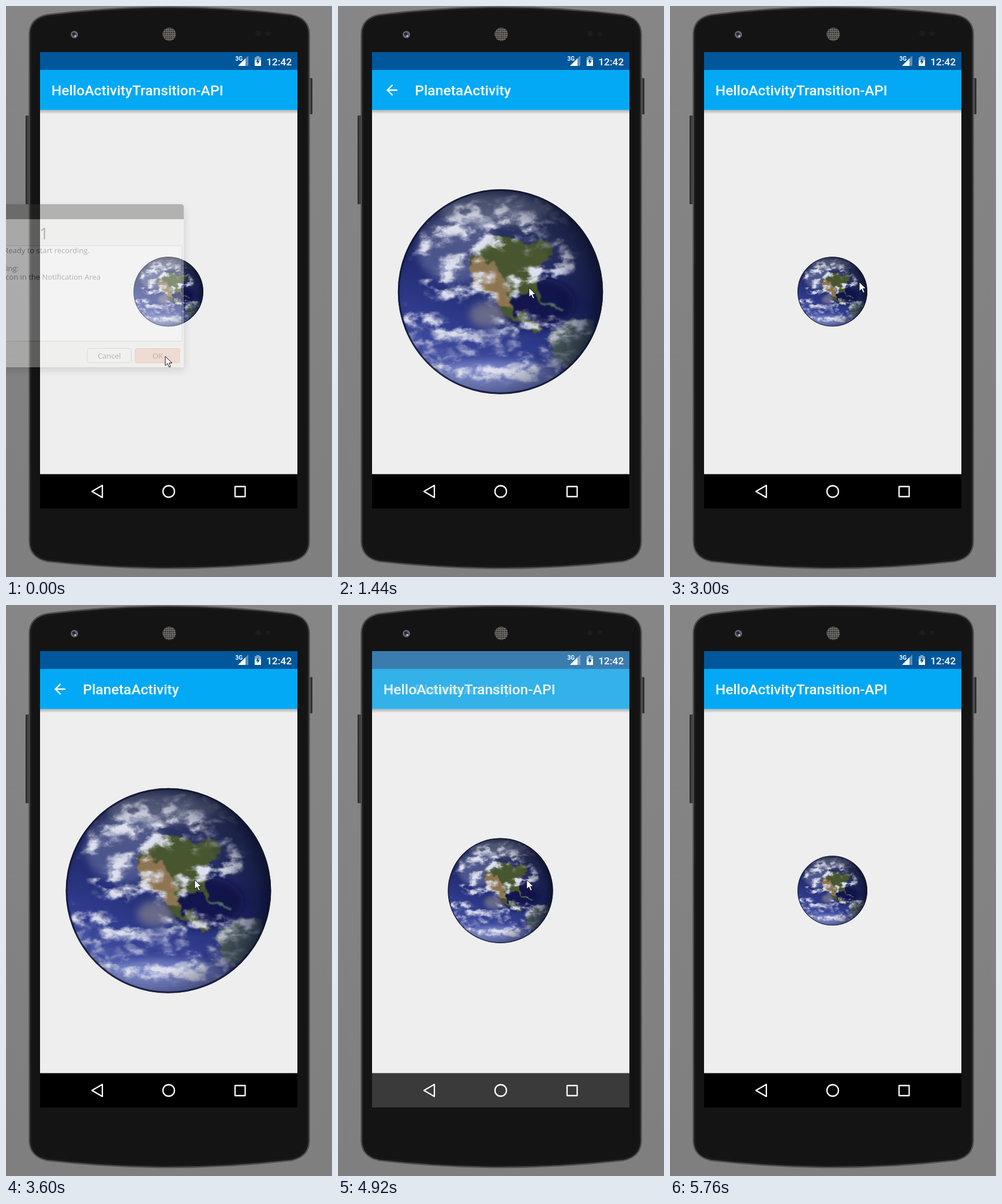
An HTML page that plays this animation: 565 px wide and 991 px high, repeating every 6.96 s.

```html
<!DOCTYPE html>
<html lang="en">
<head>
<meta charset="utf-8">
<title>Activity transition</title>
<style>
  html, body { margin: 0; width: 100%; height: 100%; overflow: hidden; background: #828282; }
  svg { display: block; width: 100%; height: 100%; }
  text { font-family: Roboto, sans-serif; font-weight: 500; fill: #fff; white-space: pre; }
  .title { font-size: 24.65px; }
  #dialog text { font-family: "Open Sans", "Noto Sans", sans-serif; font-weight: 400; font-size: 13px; fill: #3c3c3c; }
</style>
</head>
<body>
<svg viewBox="0 0 565 991" preserveAspectRatio="none">
  <defs>
    <linearGradient id="backdrop" x2="0" y2="1">
      <stop stop-color="#868686"/><stop offset="1" stop-color="#7f7f7f"/>
    </linearGradient>
    <linearGradient id="barShadow" x2="0" y2="1">
      <stop stop-color="#000" stop-opacity=".26"/><stop offset="1" stop-color="#000" stop-opacity="0"/>
    </linearGradient>
    <linearGradient id="sideKey">
      <stop stop-color="#1c1c1c"/><stop offset=".5" stop-color="#484848"/><stop offset="1" stop-color="#202020"/>
    </linearGradient>
    <linearGradient id="ocean" x1=".25" x2=".6" y1="1" y2="0">
      <stop stop-color="#5563b4"/><stop offset=".3" stop-color="#303c8e"/>
      <stop offset=".6" stop-color="#1f2868"/><stop offset="1" stop-color="#343b5a"/>
    </linearGradient>
    <radialGradient id="shade" cx=".4" cy=".53" r=".62">
      <stop offset=".6" stop-color="#0a1030" stop-opacity="0"/>
      <stop offset=".85" stop-color="#0a1030" stop-opacity=".5"/>
      <stop offset="1" stop-color="#080c22" stop-opacity=".92"/>
    </radialGradient>
    <radialGradient id="lens">
      <stop stop-color="#2a2f48"/><stop offset=".55" stop-color="#565a70"/><stop offset="1" stop-color="#707072"/>
    </radialGradient>
    <pattern id="mesh" width="3.4" height="3.4" patternUnits="userSpaceOnUse">
      <rect width="3.4" height="3.4" fill="#77746f"/><circle cx="1.7" cy="1.7" r="1.15" fill="#1a1a1a"/>
    </pattern>
    <clipPath id="disc"><circle r="178"/></clipPath>
    <filter id="rough" x="-20%" y="-20%" width="140%" height="140%" color-interpolation-filters="sRGB">
      <feTurbulence type="fractalNoise" baseFrequency=".06" numOctaves="4" seed="5"/>
      <feDisplacementMap in="SourceGraphic" scale="18" xChannelSelector="R" yChannelSelector="G"/>
      <feGaussianBlur stdDeviation="1.2"/>
    </filter>
    <!-- soft shapes broken up by fine noise -->
    <filter id="wisps" x="-20%" y="-20%" width="140%" height="140%" color-interpolation-filters="sRGB">
      <feTurbulence type="fractalNoise" baseFrequency=".03 .045" numOctaves="5" seed="8" result="noise"/>
      <feColorMatrix in="noise" values="0 0 0 0 .87  0 0 0 0 .88  0 0 0 0 .93  4.5 0 0 0 -1.65" result="mist"/>
      <feGaussianBlur in="SourceGraphic" stdDeviation="4"/>
      <feDisplacementMap in2="noise" scale="40" xChannelSelector="G" yChannelSelector="B" result="mask"/>
      <feComposite in="mist" in2="mask" operator="in"/>
    </filter>
    <filter id="soft" x="-20%" y="-20%" width="140%" height="140%"><feGaussianBlur stdDeviation="7"/></filter>
    <clipPath id="screen"><rect x="59" y="80" width="446" height="792"/></clipPath>
  </defs>

  <rect width="565" height="991" fill="url(#backdrop)"/>

  <!-- phone body -->
  <rect x="34" y="190" width="7" height="154" rx="1.5" fill="url(#sideKey)"/>
  <rect x="524" y="125" width="7" height="63" rx="1.5" fill="url(#sideKey)"/>
  <path d="M40.500 48C41 30 51 19 72 15Q180 2 283 2T494 15C515 19 525 30 525.500 48V930C525 949 514 960 494 964Q386 976 283 976T72 964C52 960 41 949 40.500 930Z"
    fill="#141414" stroke="#4e4e50" stroke-width="2.400"/>
  <path d="M43.500 49C44 33 54 22 74 18Q180 5 283 5T492 18C512 22 522 33 522.500 49V929C522 946 512 957 492 961Q386 973 283 973T74 961C54 957 44 946 43.500 929Z"
    fill="none" stroke="#222"/>
  <circle cx="118.500" cy="49.500" r="6.300" fill="url(#lens)"/>
  <circle cx="117.500" cy="48.500" r="2.600" fill="#20243c"/>
  <circle cx="120" cy="52" r="1.500" fill="#d5d5e2"/>
  <circle cx="283" cy="49" r="11.500" fill="url(#mesh)"/>
  <circle cx="437" cy="48" r="5" fill="#1e1b1b"/>
  <circle cx="454" cy="48" r="4" fill="#1e1b1b"/>

  <!-- screen -->
  <g clip-path="url(#screen)">
    <rect x="59" y="80" width="446" height="792" fill="#eee"/>
    <rect x="59" y="180.500" width="446" height="7" fill="url(#barShadow)"/>
    <rect x="59" y="80" width="446" height="31" fill="#01579b"/>
    <rect x="59" y="111" width="446" height="69.500" fill="#03a9f4"/>
    <rect x="59" y="812.500" width="446" height="59.500"/>
    <g id="veil">
      <path d="M59 80H505V111H59ZM59 812.500H505V872H59Z" fill="#eee"/>
      <path d="M59 111H505V180.500H59Z" fill="#cacaca"/>
    </g>

    <text id="home" class="title" x="78.800" y="155">HelloActivityTransition-API</text>
    <g id="detail">
      <text class="title" x="133.300" y="155">PlanetaActivity</text>
      <path d="M103 146H86M94.500 137L85.500 146L94.500 155" fill="none" stroke="#fff" stroke-width="2.300"/>
    </g>

    <text x="397.500" y="95" font-size="10" style="font-weight:700">3G</text>
    <path d="M402 104L420 86V104Z" fill="#fff" opacity=".35"/>
    <path d="M402 104L415 91V104Z" fill="#fff"/>
    <path d="M431 89H434V87H439V89H442V95H431Z" fill="#fff" opacity=".5"/>
    <path d="M431 94H442V104H431Z" fill="#fff"/>
    <path d="M437.500 90L433.300 97.500H436L435.400 102L439.800 95H437Z" fill="#01579b"/>
    <text x="495.300" y="102.500" font-size="17.350" text-anchor="end">12:42</text>

    <g fill="none" stroke="#fff" stroke-width="2.300" stroke-linejoin="round">
      <path d="M149 842.500L167 832V853Z"/>
      <circle cx="282" cy="842.500" r="10"/>
      <rect x="397" y="834" width="17.500" height="17.500"/>
    </g>
  </g>

  <g id="globe">
    <g clip-path="url(#disc)">
      <circle r="178" fill="url(#ocean)"/>
      <g filter="url(#soft)">
        <ellipse cx="60" cy="20" rx="70" ry="45" fill="#0e1446" opacity=".8"/>
        <ellipse cx="-10" cy="150" rx="125" ry="30" fill="#9ba6dc" opacity=".6"/>
        <ellipse cx="-75" cy="-75" rx="70" ry="60" fill="#8f98bd" opacity=".4"/>
        <ellipse cx="-10" cy="-145" rx="100" ry="28" fill="#9aa1b4" opacity=".5"/>
        <ellipse cx="-22" cy="40" rx="32" ry="22" fill="#8b8790" opacity=".65"/>
      </g>
      <g filter="url(#rough)">
        <path d="M-56 -42L-44 -75L-12 -97L22 -95L48 -80L80 -92L92 -70L74 -50L60 -28L66 -2L74 22L66 18L58 2L40 2L22 8L16 22L28 42L42 34L48 46L66 62L78 70L60 70L35 55L5 38L-12 10L-44 -8Z" fill="#47562f"/>
        <path d="M-56 -42L-42 -60L-15 -50L2 -28L16 -5L16 28L2 30L-16 6L-46 -10Z" fill="#8d7551"/>
        <path d="M82 80L112 53L158 46L172 72L140 108L118 135L90 112Z" fill="#52645c"/>
        <path d="M68 20L88 24L108 30" fill="none" stroke="#4d7260" stroke-width="5"/>
      </g>
      <g id="clouds" filter="url(#wisps)" stroke="#fff" stroke-linecap="round"></g>
      <circle r="178" fill="url(#shade)"/>
    </g>
    <circle r="176.500" fill="none" stroke="#12172f" stroke-width="3" opacity=".85"/>
  </g>

  <g id="dialog">
    <rect x="-30" y="348" width="340" height="285" rx="6" fill="#000" opacity=".35" filter="url(#soft)"/>
    <path d="M-20 344H303Q308 344 308 349V627H-20Z" fill="#f2f1f0"/>
    <path d="M-20 344H303Q308 344 308 349V370H-20Z" fill="#3c3b37"/>
    <text x="58" y="405" style="font-size:28px">1</text>
    <rect x="-20" y="416" width="325" height="166" rx="2" fill="#fff" stroke="#b8b4ae"/>
    <g text-anchor="end">
      <text x="145" y="429">Ready to start recording.</text>
      <text x="22" y="460">During recording:</text>
      <text x="164" y="475">icon in the Notification Area</text>
    </g>
    <rect x="141" y="594.500" width="76" height="24.500" rx="3" fill="#f5f4f2" stroke="#b5b0a8"/>
    <rect x="224" y="594.500" width="77" height="25" rx="3" fill="#f0b79a" stroke="#dd8a60"/>
    <g text-anchor="middle">
      <text x="179" y="612">Cancel</text>
      <text x="263" y="612">OK</text>
    </g>
  </g>

  <path id="cursor" d="M0 0V16L4 12.500L6.700 18.800L9.300 17.700L6.700 11.500H11.700Z" fill="#fff" stroke="#111"/>
</svg>

<script>
const LOOP = 6960, TICK = 120, FADE = 300;
const SMALL = 60.5, LARGE = 178;

// start, direction, time already elapsed at that tick
const moves = [
  [1200, 1, 45], [2400, -1, 74], [3240, 1, 60],
  [4200, -1, 84], [4920, 1, 78], [5640, -1, 180]
];

// time, x, y
const path = [
  [0, 276, 608], [120, 277, 605], [720, 321, 510], [1200, 321, 510],
  [1440, 331, 489], [1560, 331, 489], [1800, 370, 488], [2400, 370, 488],
  [3000, 328, 479], [3240, 327, 477], [5160, 327, 477], [5400, 512, 560]
];
const CURSOR_EXIT = 5520;

const el = id => document.getElementById(id);
const clamp = v => Math.max(0, Math.min(1, v));

function svg(parent, tag, attrs) {
  const node = document.createElementNS("http://www.w3.org/2000/svg", tag);
  for (const key in attrs) node.setAttribute(key, attrs[key]);
  parent.append(node);
}

function makeClouds() {
  let seed = 11;
  const rnd = () => (seed = seed * 16807 % 2147483647) / 2147483647;
  // outline, width
  const streaks = [
    ["M-135 -65C-120 -125 -50 -130 -45 -85S-105 -60 -95 -25", 26],
    ["M-120 -15C-85 15 -50 5 -30 -25", 22],
    ["M-80 -130C-40 -150 10 -140 55 -120", 26],
    ["M-50 -62C-35 -100 -10 -110 14 -82", 26],
    ["M28 -12C60 -38 90 -24 118 -60", 26],
    ["M-165 38C-130 45 -105 75 -60 72", 20],
    ["M-42 -8L-16 12", 18],
    ["M35 50C60 50 70 70 95 72", 14],
    ["M95 75L150 65", 18],
    ["M-110 135C-40 128 20 155 95 132", 28]
  ];
  for (const [d, w] of streaks)
    svg(el("clouds"), "path", { d, fill: "none", "stroke-width": w });
  for (let i = 0; i < 90; i++) {
    const north = i % 3 === 0;
    const x = -150 + rnd() * 270;
    const y = north ? -160 + rnd() * 80 : 48 + rnd() * 85;
    svg(el("clouds"), "ellipse", {
      cx: x, cy: y, rx: 6 + rnd() * 14, ry: 3 + rnd() * 5, stroke: "none", fill: "#fff",
      transform: `rotate(${rnd() * 50 - 15} ${x} ${y})`, opacity: 0.4 + rnd() * 0.5
    });
  }
}

// cubic-bezier(.4, 0, .2, 1)
function ease(x) {
  if (x >= 1) return 1;
  let lo = 0, hi = 1;
  for (let i = 0; i < 20; i++) {
    const s = (lo + hi) / 2, r = 1 - s;
    if (1.2 * r * r * s + 0.6 * r * s * s + s ** 3 < x) lo = s; else hi = s;
  }
  return 3 * (1 - lo) * lo * lo + lo ** 3;
}

function opened(t) {
  const move = moves.filter(m => m[0] <= t).pop();
  if (!move) return { p: 0, dir: 1 };
  const [start, dir, lead] = move;
  const e = ease((t - start + lead) / FADE);
  return { p: dir > 0 ? e : 1 - e, dir };
}

function cursorAt(t) {
  const i = path.findIndex(k => k[0] > t);
  if (i < 0) return path[path.length - 1].slice(1);
  const a = path[i - 1], b = path[i], f = (t - a[0]) / (b[0] - a[0]);
  return [a[1] + (b[1] - a[1]) * f, a[2] + (b[2] - a[2]) * f];
}

function draw(t) {
  const { p, dir } = opened(t);
  const scale = (SMALL + (LARGE - SMALL) * p) / LARGE;
  el("globe").setAttribute("transform", `translate(281.5 495.8) scale(${scale})`);
  el("veil").style.opacity = p * (1 - p) * (dir > 0 ? 1.27 : 1.66);
  el("home").style.opacity = clamp(1.5 * (1 - p) - 0.2);
  el("detail").style.opacity = clamp(1.5 * p - 0.2);
  el("dialog").style.opacity = 0.33 * clamp(1 - t / 480);
  const [x, y] = cursorAt(t);
  el("cursor").setAttribute("transform", `translate(${x} ${y})`);
  el("cursor").style.opacity = t < CURSOR_EXIT ? 1 : 0;
}

makeClouds();
const began = performance.now();
let last = -1;
function frame() {
  const t = Math.floor((performance.now() - began) % LOOP / TICK) * TICK;
  if (t !== last) draw(last = t);
  requestAnimationFrame(frame);
}
frame();
</script>
</body>
</html>
```
